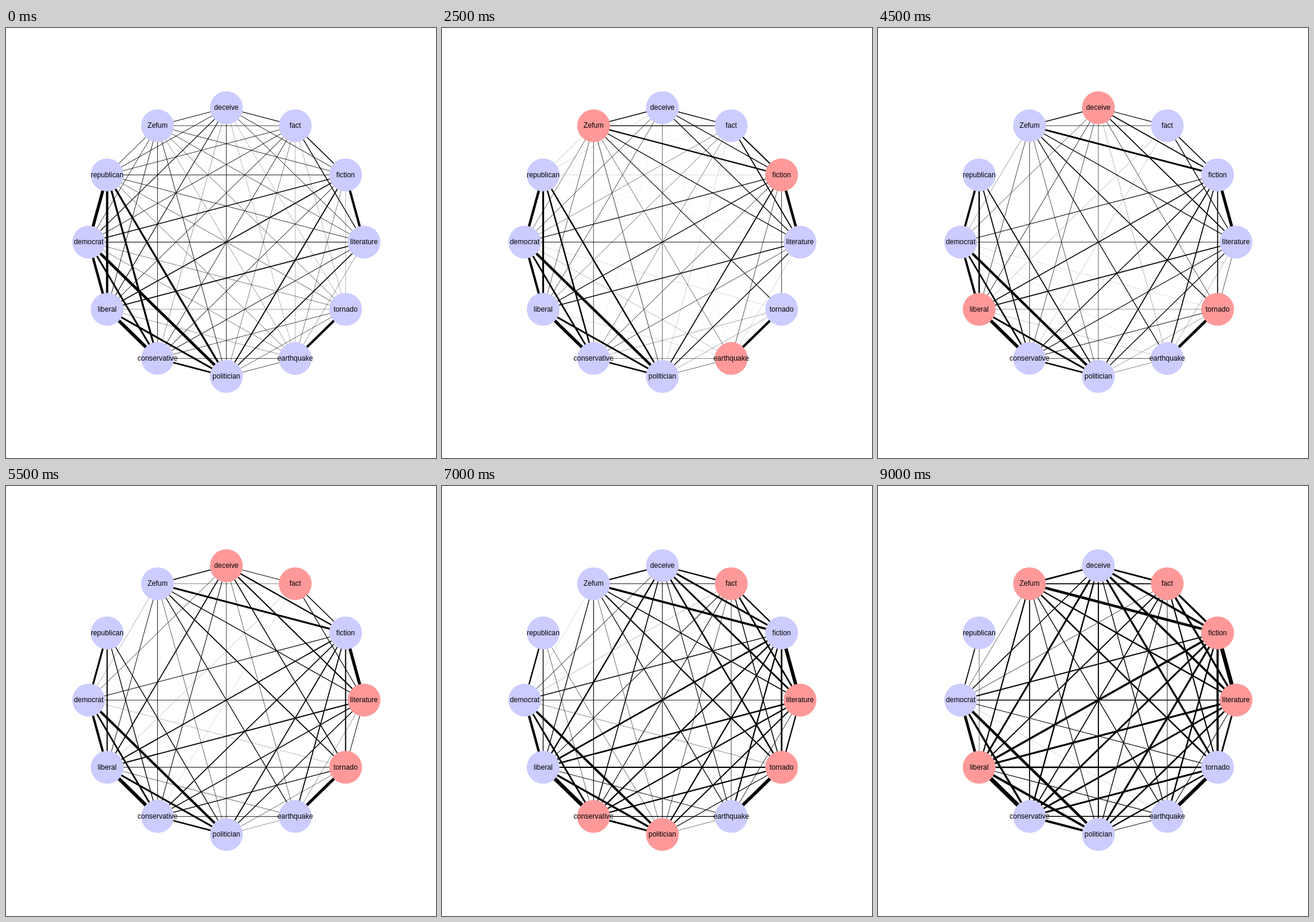
An HTML page for the animation above (9500 ms loop, 720 by 720 pixels).

```html
<!DOCTYPE html>
<html lang="en">
<head>
<meta charset="utf-8">
<title>Word network</title>
<style>
  html, body { margin: 0; width: 100%; height: 100%; overflow: hidden; background: #fff; }
  svg { display: block; width: 100vw; height: 100vh; }
  text { font: 11.9px "Liberation Sans", Arial, sans-serif; text-anchor: middle; }
  line { stroke: #000; }
</style>
</head>
<body>
<svg viewBox="0 0 720 720"><g id="edges"></g><g id="nodes"></g></svg>
<script>
const STEP = 500, STEPS = 19, UPDATES = 9;
const IDLE = '#ccccff', ACTIVE = '#ff9999';
const FADE = -0.37;   // every link of the forgotten word
const SPREAD = 0.4;   // activity passed between the two disaster words

// Name and drift per update in the four phases, counter-clockwise from the right.
const words = [
  ['literature', [-.08, .1, .1, .13]],
  ['fiction', [-.03, .1, .22, .13]],
  ['fact', [-.13, -.25, .22, .1]],
  ['deceive', [-.1, .17, .17, .2]],
  ['Zefum', [-.03, 0, 0, .1]],
  ['republican', null],
  ['democrat', [-.08, -.08, -.08, .13]],
  ['liberal', [-.1, .22, .17, .13]],
  ['conservative', [-.07, .17, .1, .2]],
  ['politician', [-.03, -.05, -.02, .2]],
  ['earthquake', [-.03, 0, 0, -.05]],
  ['tornado', [-.1, .22, .17, .17]]
].map(([name, drift], i) => {
  const angle = i * Math.PI / 6;
  return { name, drift, x: 369 + 230.5 * Math.cos(angle), y: 358.5 - 225 * Math.sin(angle) };
});

// Starting line widths from each word to all the words after it.
const startWidths = [
  [3.9, 1.4, .9, .7, .8, 1.2, 1.8, 1, 1.6, .4, 0],
  [1.5, .9, .8, .9, 1.4, 1.6, 1, 1.8, .5, .3],
  [1.1, .7, .8, .9, 1, .9, .5, .3, .3],
  [1, .9, 1.1, 1.1, .4, .9, .3, .3],
  [1, .8, .9, .9, .9, .4, .6],
  [5, 3.9, 3.2, 3.2, .6, .6],
  [4.2, 3, 4.6, .5, .5],
  [5.5, 3, .4, .4],
  [2.6, .7, .7],
  [.7, .6],
  [4]
];

const activeSets = [
  'Zefum fiction tornado',
  'Zefum deceive fact fiction literature',
  'Zefum fiction earthquake',
  'deceive fiction literature tornado conservative',
  'deceive liberal tornado',
  'deceive fact literature tornado',
  'fact literature tornado conservative politician',
  'fiction politician tornado',
  'Zefum fact fiction literature liberal'
].map(list => new Set(list.split(' ')));

function activity(name, set) {
  if (set.has(name)) return 1;
  const partner = { earthquake: 'tornado', tornado: 'earthquake' }[name];
  return set.has(partner) ? SPREAD : 0;
}

function learn(width, a, b, update) {
  if (!a.drift || !b.drift) return Math.max(0, width + FADE);
  const phase = update < 3 ? 0 : Math.floor((update - 1) / 2);
  const set = activeSets[update];
  const gain = (phase ? .35 : .75) * activity(a.name, set) * activity(b.name, set);
  return Math.max(0, width + a.drift[phase] + b.drift[phase] + gain);
}

function add(parent, tag, attributes) {
  const element = document.createElementNS('http://www.w3.org/2000/svg', tag);
  for (const key in attributes) element.setAttribute(key, attributes[key]);
  return parent.appendChild(element);
}

const edgeLayer = document.getElementById('edges');
const nodeLayer = document.getElementById('nodes');

const edges = startWidths.flatMap((row, i) => row.map((start, k) => {
  const a = words[i], b = words[i + k + 1], widths = [start];
  for (let u = 0; u < UPDATES; u++) widths.push(learn(widths[u], a, b, u));
  return { widths, line: add(edgeLayer, 'line', { x1: a.x, y1: a.y, x2: b.x, y2: b.y }) };
}));

for (const word of words) {
  word.circle = add(nodeLayer, 'circle', { cx: word.x, cy: word.y, r: 27.5 });
}
for (const { name, x, y } of words) {
  add(nodeLayer, 'text', { x, y: y + 3.8 }).textContent = name;
}

// Words light up on odd steps; the links learn from them on the next even step.
function draw(step) {
  const set = activeSets[Math.ceil(step / 2) - 1];
  for (const { name, circle } of words) {
    circle.setAttribute('fill', set && set.has(name) ? ACTIVE : IDLE);
  }
  for (const { widths, line } of edges) {
    line.setAttribute('stroke-width', widths[Math.floor(step / 2)]);
  }
}

const begin = performance.now();
let shown = -1;
function tick() {
  const step = Math.floor((performance.now() - begin) / STEP) % STEPS;
  if (step !== shown) draw(shown = step);
  requestAnimationFrame(tick);
}
tick();
</script>
</body>
</html>
```
